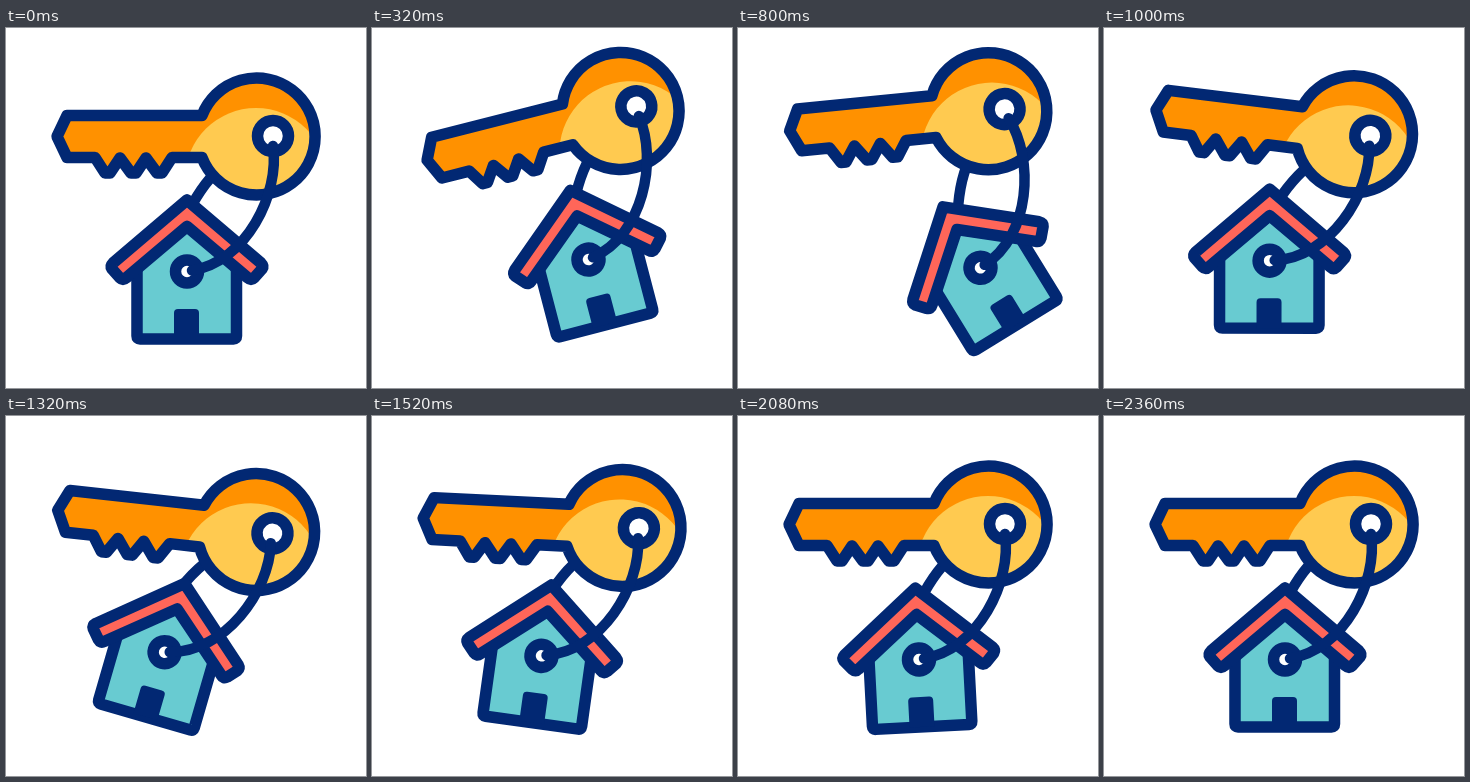
Write an HTML page that moves like this. It is 360x360 px and loops after 2.64 s.

```html
<!DOCTYPE html>
<html lang="en">
<head>
<meta charset="utf-8">
<title>House key</title>
<style>
  html, body { margin: 0; height: 100%; overflow: hidden; background: #fff; }
  svg { display: block; width: 100%; height: 100%; }
  .line { stroke: #022873; stroke-width: 11.5; stroke-linejoin: round; stroke-linecap: round; }
  .chain { fill: none; stroke-width: 10.5; }
</style>
</head>
<body>
<svg viewBox="0 0 360 360">
  <defs>
    <path id="blade" d="M51 108.5 61 87.5H196A58.5 58.5 0 1 1 196 129.5H166L156 145H151L140 130 130 145H125L114 130 104 145H99L89 129.5H61Z"/>
    <clipPath id="inside"><use href="#blade"/></clipPath>
  </defs>

  <path class="line chain" data-part="ring" d="M225 132Q203 146 186 177"/>

  <g data-part="key">
    <use href="#blade" fill="#ff9100"/>
    <circle cx="250" cy="151" r="71" fill="#ffca50" clip-path="url(#inside)"/>
    <use href="#blade" class="line" fill="none"/>
    <circle class="line" cx="267" cy="108" r="15.5" fill="#fff"/>
  </g>

  <g data-part="house">
    <path class="line" fill="#68cbd1" d="M131 238V308q0 3 3 3H227.5q3 0 3-3V238L181 198Z"/>
    <path fill="#022873" d="M168 311V285q0-4 4-4h17q4 0 4 4V311Z"/>
    <path class="line" fill="#ff6659" d="M181 172 255 235q3 3 1 6l-8 9q-3 3-6 0L181 198.5 120 250q-3 3-6 0l-8-9q-2-3 1-6Z"/>
    <circle class="line" cx="181" cy="243.5" r="11.5" fill="#fff"/>
  </g>

  <path class="line chain" data-part="ring" d="M267 118C274 166 240 234 186 242.5"/>
</svg>
<script>
const LOOP = 2640;

// Smooth step from 0 to 1 between two times
function ease(t, from, to) {
  const u = Math.min(1, Math.max(0, (t - from) / (to - from)));
  return u * u * (3 - 2 * u);
}

// Eases from rest at `begin` through the turning points [time, value]
function swing(t, begin, ...turns) {
  let time = begin, value = 0, result = 0;
  for (const [nextTime, nextValue] of turns) {
    result += (nextValue - value) * ease(t, time, nextTime);
    [time, value] = [nextTime, nextValue];
  }
  return result;
}

const parts = document.querySelectorAll('[data-part]');

function draw(t) {
  // Each part follows the one it hangs from a little later
  const lift = swing(t, 40, [680, -20], [1360, 0]);
  const key = swing(t, 40, [500, -21.5], [1080, 8.5], [1800, 0]);
  const ring = swing(t, 80, [640, -38], [1100, 12.5], [1840, 0]);
  const house = swing(t, 120, [640, -44], [1200, 18], [1900, -5], [2320, 0]);

  const pose = {};
  pose.key = `translate(0 ${lift}) rotate(${key} 180 108)`;
  pose.ring = `${pose.key} rotate(${ring - key} 267 108)`;
  pose.house = `${pose.ring} rotate(${house - ring} 181 243.5)`;
  parts.forEach(el => el.setAttribute('transform', pose[el.dataset.part]));
}

const start = performance.now();
function tick() {
  draw((performance.now() - start) % LOOP);
  requestAnimationFrame(tick);
}
tick();
</script>
</body>
</html>
```
